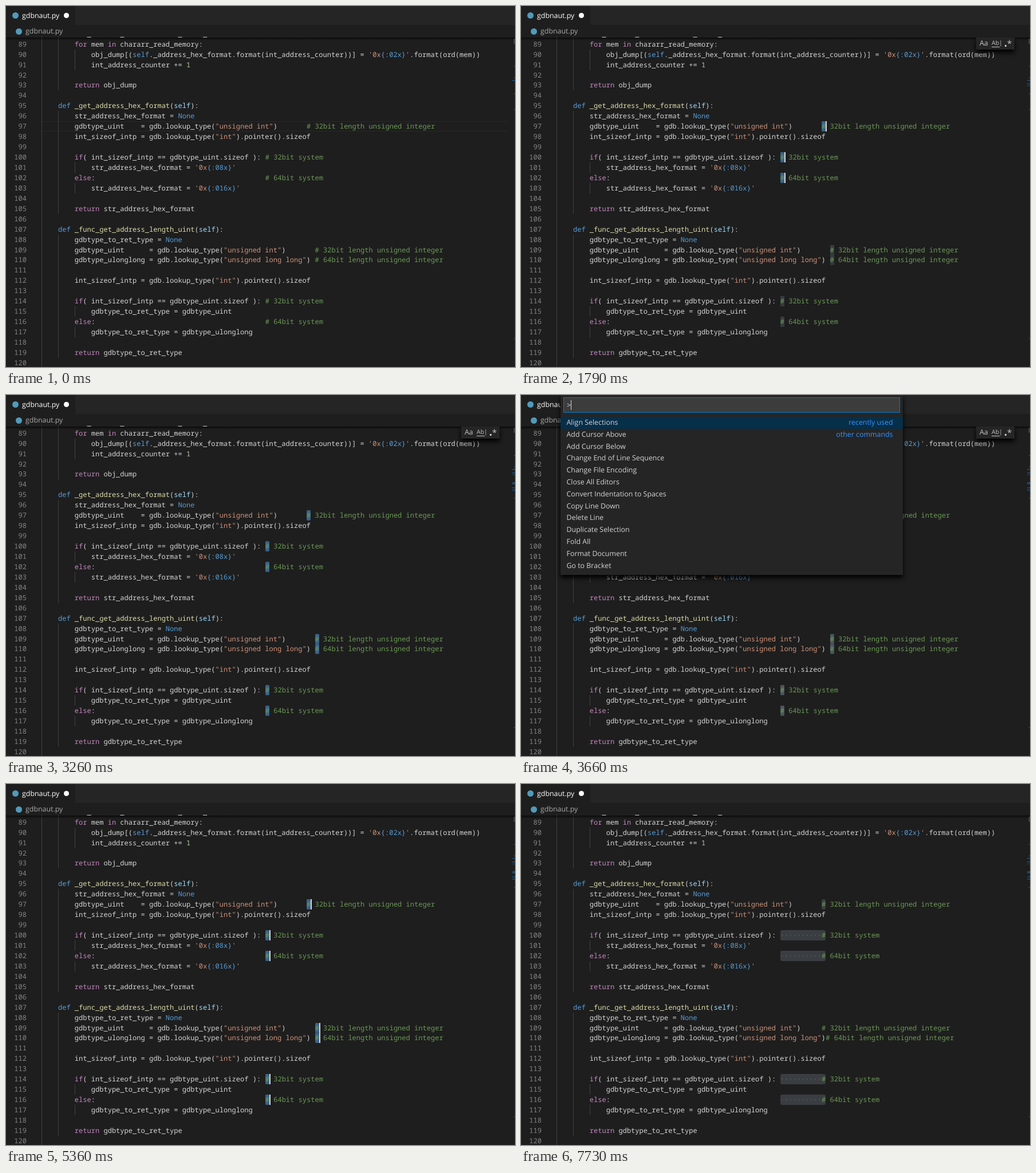
Write an HTML page that moves like this. It is 889 px wide and 630 px high and loops after 7.81 s.

```html
<!DOCTYPE html>
<html lang="en">
<head>
<meta charset="utf-8">
<title>Align comments</title>
<style>
html, body { margin: 0; width: 100%; height: 100%; overflow: hidden; background: #1e1e1e; }
#stage { position: relative; width: 889px; height: 630px; overflow: hidden; background: #1e1e1e;
  font: 12.4px "Open Sans", "Noto Sans", sans-serif; color: #d4d4d4; text-rendering: geometricPrecision; }
#stage div { position: absolute; white-space: pre; box-sizing: border-box; }
#editor { left: 0; top: 53px; width: 889px; height: 577px; overflow: hidden; }
#editor > div { left: 0; top: -53px; width: 889px; height: 630px; }
.code { font: 12.06px/17.94px "Noto Sans Mono", "DejaVu Sans Mono", monospace; }
.num { color: #858585; text-align: right; }
.str { color: #ce9178; } .com { color: #6a9955; } .ctl { color: #c586c0; }
.kw { color: #569cd6; } .par { color: #9cdcfe; } .fn { color: #dcdcaa; } .lit { color: #b5cea8; }
.dots { color: rgba(227, 228, 226, .28); }
.guide { background: #404040; }
.sel { background: #264f78; border-radius: 3px; }
.idle { background: #3a3d41; border-radius: 3px; }
.same { background: rgba(173, 214, 255, .15); }
.caret { background: #d8d8d8; }
.line { border: 1.9px solid #282828; border-right: 0; }
.icon { background: #519aba; border-radius: 50%; }
.popup { background: #252526; box-shadow: 0 5px 8px #000; }
.input { background: #3c3c3c; border: 1px solid #007acc; }
.right { text-align: right; color: #3794ff; }
b { color: #18a3ff; }
</style>
</head>
<body>
<div id="stage">
  <div id="editor">
    <div id="back"></div><div id="code"></div><div id="front"></div>
  </div>
  <div id="chrome"></div>
  <div id="overlay"></div>
</div>
<script>
const LOOP = 7810, FIRST = 88, ROW = 17.94, COL = 7.236;
const lineY = n => 57.7 + (n - 89) * ROW;
const colX = c => 62 + c * COL;

const source = `        int_address_counter = int_start_address
        for mem in chararr_read_memory:
            obj_dump[(self._address_hex_format.format(int_address_counter))] = '0x{:02x}'.format(ord(mem))
            int_address_counter += 1

        return obj_dump

    def _get_address_hex_format(self):
        str_address_hex_format = None
        gdbtype_uint    = gdb.lookup_type("unsigned int")
        int_sizeof_intp = gdb.lookup_type("int").pointer().sizeof

        if( int_sizeof_intp == gdbtype_uint.sizeof ):
            str_address_hex_format = '0x{:08x}'
        else:
            str_address_hex_format = '0x{:016x}'

        return str_address_hex_format

    def _func_get_address_length_uint(self):
        gdbtype_to_ret_type = None
        gdbtype_uint      = gdb.lookup_type("unsigned int")
        gdbtype_ulonglong = gdb.lookup_type("unsigned long long")

        int_sizeof_intp = gdb.lookup_type("int").pointer().sizeof

        if( int_sizeof_intp == gdbtype_uint.sizeof ):
            gdbtype_to_ret_type = gdbtype_uint
        else:
            gdbtype_to_ret_type = gdbtype_ulonglong

        return gdbtype_to_ret_type
`.split("\n");

// Comments: line, column before and after aligning, time of selection, text
const comments = [
  [97, 64, 64, 1000, "# 32bit length unsigned integer"],
  [100, 54, 64, 1480, "# 32bit system"],
  [102, 54, 64, 1710, "# 64bit system"],
  [109, 66, 64, 1940, "# 32bit length unsigned integer"],
  [110, 66, 65, 2110, "# 64bit length unsigned integer"],
  [114, 54, 64, 2420, "# 32bit system"],
  [116, 54, 64, 2800, "# 64bit system"],
].map(([line, from, to, time, text]) => ({ line, from, to, time, text }));

const box = (cls, x, y, w, h, text = "", css = "") =>
  `<div class="${cls}" style="left:${x}px;top:${y}px;width:${w}px;height:${h}px;${css}">${text}</div>`;
const label = (x, mid, text, css = "", w = 500, cls = "") =>
  box(cls, x, mid - 10, w, 20, text, "line-height:20px;" + css);
const cell = (cls, line, col, n, text = "") => box(cls, colX(col), lineY(line), n * COL, ROW, text);
const guide = (col, from, to, css = "") =>
  box("guide", colX(col), lineY(from), 1, (to - from + 1) * ROW, "", css);

const tokens = /(?<str>'[^']*'|"[^"]*")|(?<ctl>\b(?:for|in|if|else|return)\b)|(?<kw>\b(?:def|None|self(?=\.))\b)|(?<par>\bself\b)|(?<fn>(?<=def )\w+)|(?<lit>\b\d+\b)/g;
function paint(text) {
  return text.replace(tokens, (s, ...rest) => {
    const groups = rest.at(-1);
    const cls = Object.keys(groups).find(k => groups[k] !== undefined);
    return `<span class="${cls}">${s.replace(/\{.*\}/, '<span class="kw">$&</span>')}</span>`;
  });
}

function staticCode() {
  const guides = [[0, 88, 120], [4, 88, 93], [4, 96, 105], [4, 108, 119], [8, 90, 91],
    [8, 101, 101], [8, 103, 103], [8, 115, 115], [8, 117, 117]];
  return guides.map(g => guide(...g)).join("") + source.map((text, i) => {
    const line = FIRST + i;
    return box("code num", 0, lineY(line), 36, ROW, line) + cell("code", line, 0, 115, paint(text));
  }).join("");
}

function staticChrome() {
  return box("", 0, 0, 889, 33, "", "background:#252526") +
    box("", 0, 0, 121, 33, "", "background:#1e1e1e") +
    box("icon", 10.5, 11, 11, 11) + label(28, 16.5, "gdbnaut.py", "color:#fff") +
    box("", 101, 12, 8.6, 8.6, "", "background:#fff;border-radius:50%") +
    box("icon", 16.5, 38.5, 11, 11) + label(34, 44, "gdbnaut.py", "color:#a9a9a9") +
    box("", 0, 54.5, 889, 5, "", "background:linear-gradient(rgba(0,0,0,.65),transparent)") +
    box("", 887, 57, 1, 9, "", "background:#666") +
    [105, 125, 153, 180, 580].map(y => box("", 887, y, 2, 1, "", "background:#456")).join("");
}

function caretsOn(t) {
  const flips = [240, 530, 1000, 3260, 5360, 5840, 6390, 6850, 7400, 7730];
  return flips.filter(f => t >= f).length % 2 === 1;
}

function drawBack(t, aligned, focused) {
  let out = "";
  if (t < 1000) {
    return box("line", colX(0), lineY(97), 813, ROW) + guide(4, 96, 105, "background:#707070");
  }
  for (const c of comments) {
    const tone = focused ? "sel" : "idle";
    if (!aligned) {
      if (t >= c.time) out += cell(tone, c.line, c.from, 1);
      out += cell("same", c.line, c.from, 1);
    } else if (c.from <= c.to) {
      out += cell(tone, c.line, c.from, c.to - c.from + 1);
    }
  }
  return out;
}

function drawFront(t, aligned) {
  let out = "";
  for (const c of comments) {
    const col = aligned ? c.to : c.from;
    out += cell("code com", c.line, col, 40, c.text);
    if (aligned && c.to > c.from) out += cell("code dots", c.line, c.from, 10, "·".repeat(c.to - c.from));
    if (caretsOn(t) && t >= c.time) out += box("caret", colX(col + 1), lineY(c.line), 1.9, ROW);
  }
  if (t < 1000 && caretsOn(t)) out += box("caret", colX(64), lineY(97), 1.9, ROW);
  // Minimap marks follow the selection a moment later
  for (const c of comments) {
    if (c.line === 97 || t >= c.time + 80)
      out += box("", 884, 129 + (c.line - 97) * 1.9, 5, 1.9, "", "background:#1d4568");
  }
  return out;
}

const recent = ["Align Selections", "Add Cursor Above", "Add Cursor Below", "Change End of Line Sequence",
  "Change File Encoding", "Close All Editors", "Convert Indentation to Spaces", "Copy Line Down",
  "Delete Line", "Duplicate Selection", "Fold All", "Format Document", "Go to Bracket"];
const matching = ["Align Selections", "Close All Editors", "Close All Groups", "Expand All Folders",
  "Fold All", "Fold All Block Comments", "Fold All Regions", "Replace All", "Save All",
  "Select All", "Select All Occurrences", "Unfold All", "Unfold All Regions"];

function drawPalette(t) {
  const typed = t < 3900 ? "" : t < 4520 ? "al" : "align";
  const rows = t < 3660 ? [] : t < 3900 ? recent : t < 4520 ? matching : ["Align Selections"];
  const ROW_H = 20.8;
  let out = box("popup", 69, 0, 598, rows.length ? 44 + rows.length * ROW_H : 36) +
    box("input", 74, 4, 588, 27) + label(80, 18, "&gt;" + typed +
      (t < 4990 ? '<span style="display:inline-block;width:1px;height:17px;background:#ddd;vertical-align:-4px"></span>' : ""));
  rows.forEach((name, i) => {
    const mid = 48 + i * ROW_H;
    const text = typed ? name.replace(new RegExp("\\b" + typed, "i"), "<b>$&</b>") : name;
    if (!i) out += box("", 69, 37.5, 598, 21.5, "", "background:#062f4a");
    out += label(79.5, mid, text);
    if (!i) out += label(450, mid, "recently used", "", 199.5, "right");
    if (i === 1) out += label(450, mid, "other commands", "", 199.5, "right");
  });
  return out;
}

function drawOverlay(t) {
  let out = "";
  if (t >= 1480 && t < 4830) {
    out += box("", 788, 55, 101, 40,
      box("popup", 7, 0, 67, 21) +
      label(13, 10, "Aa", "color:#c5c5c5", 20) +
      label(34, 9.5, "Ab|", "color:#c5c5c5;font-size:10.5px", 20) +
      box("", 34, 16, 14, 1, "", "background:#c5c5c5") +
      box("", 57, 13, 3, 3, "", "background:#c5c5c5") +
      label(61, 11, "*", "color:#c5c5c5;font-size:15px", 12), "overflow:hidden");
  }
  if (t >= 3580 && t < 5360) out += drawPalette(t);
  return out;
}

const shown = {};
function put(id, html) {
  if (shown[id] !== html) document.getElementById(id).innerHTML = shown[id] = html;
}

function frame() {
  const t = performance.now() % LOOP;
  const aligned = t >= 5450;
  const focused = t < 3580 || (t >= 5360 && t < 7730);
  put("back", drawBack(t, aligned, focused));
  put("front", drawFront(t, aligned));
  put("overlay", drawOverlay(t));
  requestAnimationFrame(frame);
}

put("code", staticCode());
put("chrome", staticChrome());
frame();
</script>
</body>
</html>
```
